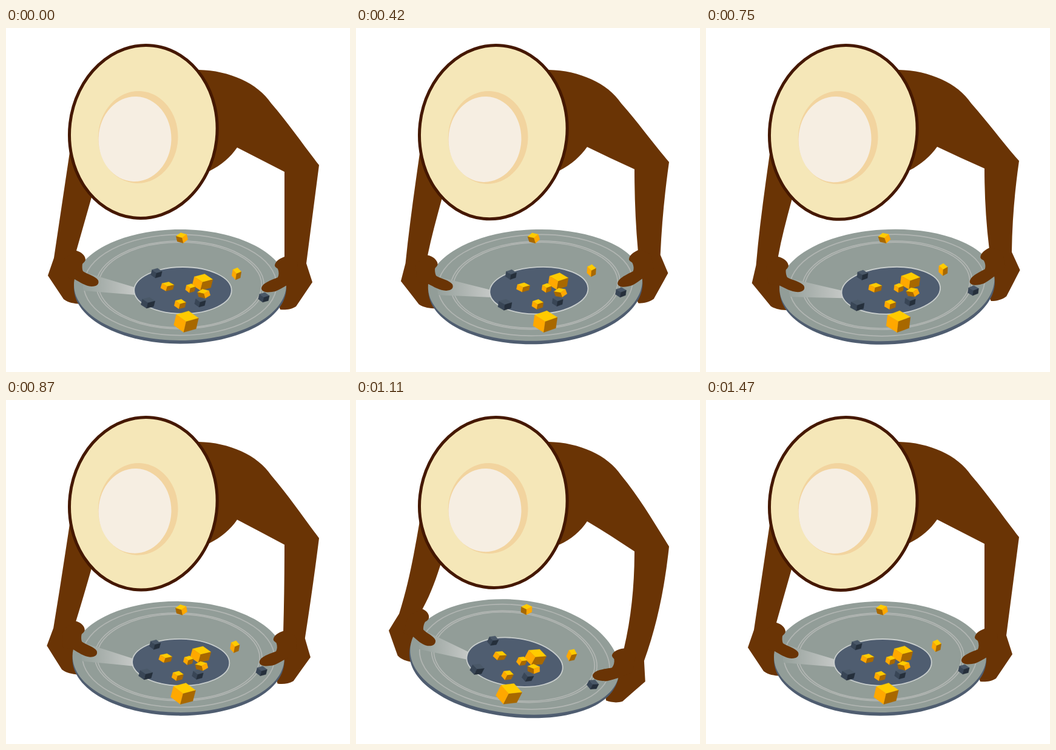
Animation, 567 px wide and 567 px high, one loop 1.8 s. Source, as an HTML page:

```html
<!DOCTYPE html>
<html lang="en">
<head>
<meta charset="utf-8">
<title>Gold panning</title>
<style>
  html, body { margin: 0; width: 100%; height: 100%; overflow: hidden; background: #fff; }
  svg { display: block; width: 100vw; height: 100vh; }
</style>
</head>
<body>
<svg id="stage" viewBox="0 0 567 567">
  <defs>
    <linearGradient id="shine">
      <stop offset="0" stop-color="#949f9a"/>
      <stop offset="1" stop-color="#c6c9c7"/>
    </linearGradient>
  </defs>
</svg>
<script>
const LOOP = 1800, STEP = 30;
const SKIN = '#6a3405', GREY = '#929d98', SLATE = '#4f5d70', RING = '#b2b6b3';
const GOLD = ['#ffcb00', '#ffa800', '#a86800'];
const ROCK = ['#4a5868', '#394656', '#252f3b'];

const stage = document.getElementById('stage');
const shapes = [];

const clamp = v => Math.max(0, Math.min(1, v));
const smooth = v => clamp(v) ** 2 * (3 - 2 * clamp(v));

// Lower parts slide sideways by v; everything tilts around the middle of the pan
function bend(x, y, v) {
  const still = 311 + 0.18 * Math.max(0, 290 - x);
  const slide = Math.max(0, y - still) / 173;
  const arm = (Math.exp(0.0025 * (x - 295)) - 1) / 0.0025;
  const tilt = -0.0036 * arm * smooth((y - 120) / 280);
  return [v * slide, v * tilt];
}

// Reads absolute M, L, C and z; straight edges become cubics so they can bend
function compile(d) {
  const out = [];
  let last;
  for (const [, cmd, body] of d.matchAll(/([MLCz])([^MLCz]*)/g)) {
    const n = (body.match(/-?[\d.]+/g) || []).map(Number);
    let pts = [];
    for (let i = 0; i < n.length; i += 2) pts.push([n[i], n[i + 1]]);
    if (cmd === 'L') {
      pts = pts.flatMap(p => {
        const [x, y] = last;
        last = p;
        return [1 / 3, 2 / 3, 1].map(k => [x + (p[0] - x) * k, y + (p[1] - y) * k]);
      });
    }
    if (pts.length) last = pts[pts.length - 1];
    out.push({ cmd: cmd === 'L' ? 'C' : cmd, pts });
  }
  return out;
}

function add(d, fill, { stroke = 'none', width = 0, give = 1 } = {}) {
  const el = document.createElementNS('http://www.w3.org/2000/svg', 'path');
  el.setAttribute('fill', fill);
  el.setAttribute('stroke', stroke);
  el.setAttribute('stroke-width', width);
  stage.append(el);
  shapes.push({ el, give, segs: compile(d) });
}

function oval(cx, cy, rx, ry, tilt = 0) {
  const n = 8, step = 2 * Math.PI / n, k = 4 / 3 * Math.tan(step / 4);
  const co = Math.cos(tilt), si = Math.sin(tilt);
  const at = (a, t) => {
    const x = rx * (Math.cos(a) - t * Math.sin(a));
    const y = ry * (Math.sin(a) + t * Math.cos(a));
    return (cx + x * co - y * si).toFixed(3) + ',' + (cy + x * si + y * co).toFixed(3) + ' ';
  };
  let d = 'M' + at(0, 0);
  for (let i = 0; i < n; i++) {
    const a = i * step;
    d += 'C' + at(a, k) + at(a + step, -k) + at(a + step, 0);
  }
  return d + 'z';
}

// A turned cube: lit, side and shaded face; a negative width mirrors it
function gem(colors, x, y, w, h) {
  const corner = i => {
    const a = i * Math.PI / 3 - 0.33;
    return (x + w / 1.95 * Math.cos(a)).toFixed(2) + ',' + (y + h / 1.95 * Math.sin(a)).toFixed(2);
  };
  [4, 2, 0].forEach((i, f) => {
    const d = `M${x},${y} L${corner(i)} L${corner(i + 1)} L${corner(i + 2)} z`;
    add(d, colors[f], { stroke: colors[f], width: 0.4 });
  });
}

// Arms and back
add('M318,69 C368,70 415,91 437,124 C468,160 490,193 516,226 L495,388 L505,419 L478,459 ' +
    'C470,464 460,465 452,464 L440,430 L459,378 L459,237 L381,197 C370,213 355,226 335,236 L250,200 z', SKIN);
add('M105,205 L79,379 L69,408 L95,447 C103,453 112,454 122,455 L140,420 L116,367 L141,279 L180,200 z', SKIN);

// Pan
add(oval(287, 428.5, 175, 92), SLATE);
add(oval(287, 423.5, 175, 91.5), GREY);
for (const k of [0.908, 0.79, 0.768]) {
  add(oval(287, 423.5, 175 * k, 91.5 * k), 'none', { stroke: RING, width: 1.7 });
}
add('M124,401 L214,428 L214,440 L128,433 z', 'url(#shine)');
add(oval(291.5, 432.5, 80.3, 38.5), SLATE, { stroke: '#c9cecd', width: 1.8 });

// Stones
gem(ROCK, 248, 404, 19, 16);
gem(ROCK, 425, 444, 19, 16);
gem(ROCK, 320, 452, 19, 16);
gem(ROCK, 234, 453, 24, 18);

// Nuggets
gem(GOLD, 290, 346, -20, 17);
gem(GOLD, 380, 405, 16, 20);
gem(GOLD, 266, 426, 23, 15);
gem(GOLD, 324, 419, 35, 27);
gem(GOLD, 304, 429, 17, 15);
gem(GOLD, 326, 438, -22, 15);
gem(GOLD, 287, 455, 20, 16);
gem(GOLD, 297, 484, 42, 35);

// Thumbs
add('M116,367 C124,369 131,375 131,382 C130,386 127,387 126,389 C125,394 126,399 127,401 ' +
    'C134,406 148,409 152,416 C154,422 150,426 141,426 C130,425 122,419 113,414 L95,410 L95,380 z', SKIN);
add('M462,376 C452,379 444,384 443,391 C443,394 446,395 448,397 C450,402 450,407 448,411 ' +
    'C436,416 421,421 421,430 C423,437 435,436 444,434 C452,431 457,427 463,424 L482,410 L480,385 z', SKIN);

// Hat, stiffer than the rest
const give = 0.5;
add(oval(226.3, 171, 121.5, 142.7, 0.115), '#f5e7b8', { stroke: '#451800', width: 5, give });
add(oval(217.7, 180, 65.8, 76, 0.04), '#f2d49f', { give });
add(oval(212.5, 183, 60, 70, 0.04), '#f6eee2', { give });

// Sideways travel of the pan: [time, offset]
const keys = [[0, 0], [270, 0], [660, 39], [1080, -49], [1470, 0], [LOOP, 0]];

function swing(t) {
  const i = keys.findIndex(k => k[0] > t);
  const [a, b] = [keys[i - 1], keys[i]];
  return a[1] + (b[1] - a[1]) * (t - a[0]) / (b[0] - a[0]);
}

function render(ms) {
  const v = swing(Math.floor((ms % LOOP) / STEP) * STEP);
  for (const { el, give, segs } of shapes) {
    const place = ([x, y]) => {
      const [dx, dy] = bend(x, y, v * give);
      return (x + dx).toFixed(2) + ',' + (y + dy).toFixed(2);
    };
    el.setAttribute('d', segs.map(s => s.cmd + s.pts.map(place).join(' ')).join(''));
  }
}

let start;
function tick(now) {
  if (start === undefined) start = now;
  render(now - start);
  requestAnimationFrame(tick);
}
render(0);
requestAnimationFrame(tick);
</script>
</body>
</html>
```
